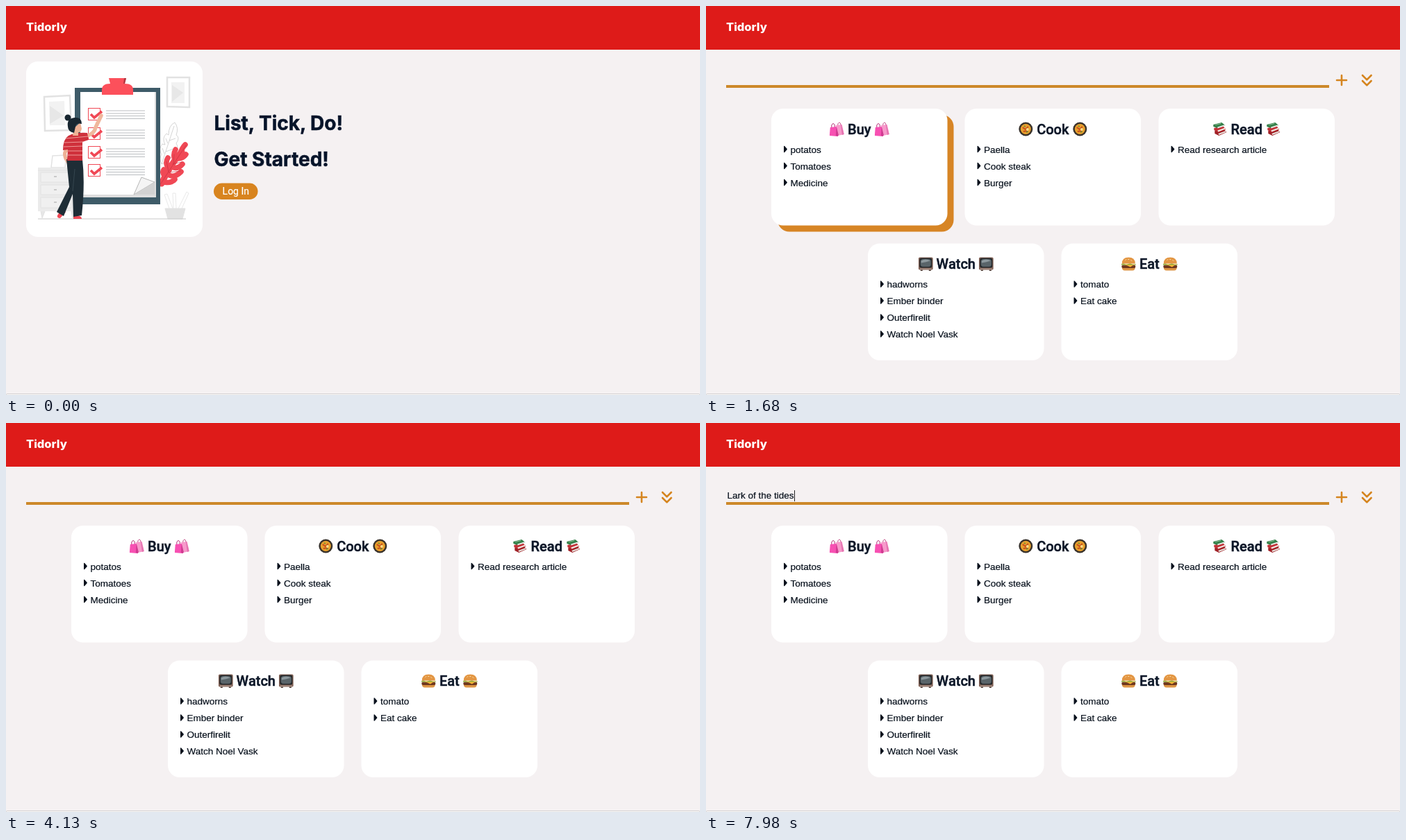
Write an HTML page that moves like this. It is 999 px wide and 561 px high and loops after 8 s.

```html
<!DOCTYPE html>
<html lang="en">
<head>
<meta charset="utf-8">
<title>To-do lists</title>
<style>
  html, body { margin: 0; width: 100%; height: 100%; overflow: hidden; background: #f5f1f2; }
  svg { display: block; }
  #stage { position: absolute; left: 0; top: 0; }
  .logo, .head { font-family: Inter, "Open Sans", sans-serif; }
  .logo { font-size: 16.5px; font-weight: 800; fill: #fff; }
  .head { font-size: 28px; font-weight: 700; fill: #07142a; stroke: #07142a; stroke-width: .5; }
  .btn { font: 14px Roboto, sans-serif; fill: #fff; stroke: #fff; stroke-width: .2; text-anchor: middle; }
  .title { font: 500 20px Roboto, sans-serif; fill: #0c1728; stroke: #0c1728; stroke-width: .5; text-anchor: middle; }
  .item, #input { font: 13.5px "Liberation Sans", Arial, sans-serif; fill: #07101c; }
  .item { stroke: #07101c; stroke-width: .2; }
  #input {
    position: absolute; left: 30.5px; top: 97px; height: 16px; line-height: 16px;
    white-space: pre; color: #07101c; border-right: 1px solid transparent;
    -webkit-text-stroke: .2px #07101c;
  }
  #input.caret { border-color: #222; }
  .icon { fill: none; stroke: #d5851f; stroke-width: 2.6; stroke-linecap: round; stroke-linejoin: round; }
</style>
</head>
<body>
<svg id="stage" width="999" height="561" viewBox="0 0 999 561">
  <defs>
    <symbol id="bag" viewBox="0 0 21 21">
      <path d="M12 7V3q2.500-4 4 0v4" fill="none" stroke="#c4568c"/>
      <path d="M9 5l9-1 3 14-9 2z" fill="#f79acb"/>
      <path d="M17 4l4 14-3 1-2-15z" fill="#e574b1"/>
      <path d="M3 9V5q2.500-5 4.500 0v4" fill="none" stroke="#b32d76"/>
      <path d="M1 8l9-1 2 14-12-1z" fill="#f750b2"/>
      <path d="M10 7l3 12-1 2-3-1z" fill="#cf3a90"/>
    </symbol>
    <symbol id="pan" viewBox="0 0 21 21">
      <circle cx="10.500" cy="10.500" r="10" fill="#3a332c"/>
      <circle cx="10.500" cy="10.500" r="7.500" fill="#e8a02c"/>
      <path d="M6 8l4 3 4-4M7 14l6-1" stroke="#c8501f" stroke-width="2" fill="none"/>
      <circle cx="13" cy="11" r="2" fill="#f7dc86"/>
      <path d="M8 6l2 1M11 15l3-1" stroke="#6f8a35" stroke-width="1.500"/>
    </symbol>
    <symbol id="books" viewBox="0 0 21 21">
      <path d="M3 13l13-3 4 5-11 5-6-3z" fill="#a02026"/>
      <path d="M8 17l11-4v2L9 19z" fill="#e8e4de"/>
      <path d="M2 9l13-3 4 5-11 4-6-3z" fill="#c23036"/>
      <path d="M7 12.500l11-4v2L8 14.500z" fill="#f0ebe4"/>
      <path d="M1 4l12-3 5 4-11 4-6-2z" fill="#35804a"/>
      <path d="M7 7.500L18 4v2L7 9.500z" fill="#e6eae4"/>
      <path d="M4 4.500l8-2" stroke="#8fc09a"/>
    </symbol>
    <symbol id="tv" viewBox="0 0 21 21">
      <rect y="1" width="21" height="18" rx="2" fill="#806054"/>
      <rect x="1.500" y="2" width="18" height="14" rx="2.500" fill="#24282b"/>
      <rect x="3" y="3.500" width="15" height="11" rx="3.500" fill="#596469"/>
      <path d="M4 6q6-4 13 0-6 2-13 3z" fill="#8c989d"/>
      <path d="M2 17.500h17" stroke="#b5a197"/>
      <path d="M3 19h3v1.500H3zm12 0h3v1.500h-3z" fill="#4a3830"/>
    </symbol>
    <symbol id="burger" viewBox="0 0 21 21">
      <path d="M1 15h19q0 5-4 5H5q-4 0-4-5z" fill="#dd9545"/>
      <rect x=".5" y="12" width="20" height="4.500" rx="2" fill="#70381f"/>
      <path d="M1 11h19l-4 2-3 2-4-2z" fill="#fbb934"/>
      <path d="M0 10.500q3-1.500 5 0t5 0 5 0 6 0v1.500H0z" fill="#93ac3c"/>
      <path d="M1 10Q1 1 10.500 1T20 10z" fill="#e39643"/>
      <path d="M6 5l1-1M10 4h1M14 5l1 1" stroke="#fbe3b0" stroke-linecap="round"/>
    </symbol>
  </defs>

  <rect width="999" height="561" fill="#f5f1f2"/>
  <rect width="999" height="63" fill="#de1b19"/>
  <text class="logo" x="29" y="35.500">Tidorly</text>
  <path d="M0 562v-1q0-1.500 2-1.500h995q2 0 2 1.500v1z" fill="#fff" stroke="#cfcccd"/>

  <g id="home">
    <rect x="29" y="80" width="254" height="253" rx="17" fill="#fff"/>
    <!-- wall frames, cabinet, pot -->
    <g stroke="#e2e2e2" fill="#fff">
      <path d="M55 131l37-2 2 50-38 1zM232 103h32v43l-32-1z" stroke-width="2.500"/>
      <path d="M62 138l22-1 1 35H63zM238 110h19v30h-19z" fill="#f2f2f2" stroke="none"/>
      <path d="M63 144l20 14-20 12zM239 114l16 11-16 13z" fill="#e7e7e7" stroke="none"/>
      <path d="M67 216l20-1-2 18H65z" stroke-width="1.500"/>
      <path d="M46 233h56v63H46z" fill="#ebebeb" stroke="none"/>
      <path d="M46 237h56M50 240h44v14H50zM50 258h44v14H50zM50 276h44v15H50z" fill="#f0f0f0"/>
      <path d="M50 296l2 10 4-10M94 296l2 10 4-10" fill="#e6e6e6"/>
      <path d="M69 246h4M69 265h4M69 283h4" stroke="#c9c9c9" stroke-width="2"/>
      <path d="M235 292l-7-20 4-1 8 21M241 292l-1-22h4l1 22M248 292l12-24 3 2-10 22" stroke-width=".8"/>
      <path d="M229 292h29l-4 15h-21z" fill="#e2e2e2"/>
    </g>
    <path d="M46 307h213" stroke="#c8c8c8"/>
    <!-- plant -->
    <path d="M224 228Q220 220 224 214 219 206 225 199l4 1q-5-10 2-16l3 2q0-14 9-18 6 8 2 18 6 4 0 12 5 8-4 12-1 12-17 18zL242 173M228 213l-3-8M230 210l11-4M233 198l-3-7M235 194l9-3" fill="#fff" stroke="#c9c9c9" stroke-width=".8"/>
    <g fill="none" stroke="#f04855" stroke-linecap="round">
      <path d="M224 256q10-24 29-46" stroke-width="9"/>
      <path d="M251 213q2-8 7-13M243 222q-3-8 1-15M235 236q-7-9-2-17M229 246q-5-6-2-10M248 220q7 0 11-6M241 233q7 2 13-5M235 244q8 4 17-5M228 254q10 2 15-4" stroke-width="7.500"/>
      <path d="M221 259q18-28 38-58M234 239l-3-15M241 228l1-14M234 240l17-2M240 228l13-3" stroke="#c83341" stroke-width=".7"/>
    </g>
    <!-- clipboard -->
    <path d="M99 118h123v168H99z" fill="#3e5b68"/>
    <path d="M107 124h109v152H107z" fill="#dedede"/>
    <path d="M107 124h107v133l-30 15h-77z" fill="#fff"/>
    <path d="M184 272l11-25 19 7z" fill="#f4f4f4" stroke="#999" stroke-width=".7"/>
    <path d="M184 272l30-18v18z" fill="#d2d2d2"/>
    <path d="M138 128v-7q0-9 12-9l-2-8h25l-2 8q12 0 12 9v7z" fill="#fc505b"/>
    <path d="M173 104l-2 8h-2l1-8z" fill="#b23741"/>
    <g id="rows"></g>
    <!-- woman -->
    <path d="M89 207q-7 3-3 13l6 9" fill="none" stroke="#eeb195" stroke-width="5"/>
    <path d="M116 188q12-5 13-13l8-17" fill="none" stroke="#f0b79c" stroke-width="5.500" stroke-linecap="round"/>
    <path d="M80 293l-6 9q-1 4 4 4l8-9zM97 300v7h12q0-4-6-5z" fill="#f04855"/>
    <path d="M87 221h23q4 35-1 81l-12 2-1-33-13 32-10-6 18-36z" fill="#1e2d36"/>
    <path d="M96 267l3-32" stroke="#35464f"/>
    <path d="M82 208q0-16 8-21 10-5 27-4l2 10-9 3v27H88l1-16z" fill="#cf303b"/>
    <path d="M86 191l32-3M84 197l27-1M83 203l27-1M89 209h21M89 215h21" stroke="#f2a6a3" stroke-width=".9"/>
    <path d="M98 176l9-8 2 9q-1 6-5 5v5h-8z" fill="#eeb195"/>
    <path d="M89 174q-2-12 10-13 10-1 10 9-8-2-9 4l-2 9q-9-2-9-9z" fill="#182630"/>
    <circle cx="89" cy="161" r="4.500" fill="#182630"/>
    <text class="head" x="299.500" y="178.500">List, Tick, Do!</text>
    <text class="head" x="299.500" y="230.500">Get Started!</text>
    <rect x="299" y="255.500" width="63.500" height="23.500" rx="11.750" fill="#d8841f"/>
    <text class="btn" x="330.800" y="272">Log In</text>
  </g>

  <rect id="line" x="29" y="114" height="4" fill="#cd892a"/>
  <g id="board">
    <path class="icon" d="M908 107h14M915 100v14M945 100l6.300 6.300 6.300-6.300M945 108l6.300 6.300 6.300-6.300"/>
    <rect id="shade" x="103" y="157" width="253.500" height="168.500" rx="17" fill="#d78525"/>
    <g id="cards"></g>
  </g>
</svg>
<div id="input"></div>

<script>
const $ = id => document.getElementById(id);
const show = (id, on) => { $(id).style.display = on ? '' : 'none'; };

// Checklist on the clipboard
$('rows').innerHTML = [147, 175, 202, 228].map(y => `
  <rect x="118.500" y="${y + .5}" width="17" height="17" fill="none" stroke="#f04855"/>
  <path d="M122 ${y + 9}l5 5 11-9" fill="none" stroke="#f04855" stroke-width="3.600"/>
  <path d="M144 ${y + 4}h56m-56 4h56m-56 3.500h56m-56 4h56" stroke="#a9adb0" stroke-width=".8"/>`).join('');

// left, top, title, emoji, emoji distance from the centre, items
const cards = [
  [94, 148, 'Buy', 'bag', 22, ['potatos', 'Tomatoes', 'Medicine']],
  [372.5, 148, 'Cook', 'pan', 28.5, ['Paella', 'Cook steak', 'Burger']],
  [651.5, 148, 'Read', 'books', 28, ['Read research article']],
  [233, 342.5, 'Watch', 'tv', 33, ['hadworns', 'Ember binder', 'Outerfirelit', 'Watch Noel Vask']],
  [511.5, 342.5, 'Eat', 'burger', 19.5, ['tomato', 'Eat cake']]
];

$('cards').innerHTML = cards.map(([x, y, title, emoji, gap, items]) => {
  const mid = 126.8;
  const pic = left => `<use href="#${emoji}" x="${left}" y="19" width="21" height="21"/>`;
  const rows = items.map((item, i) => `
    <path transform="translate(18 ${58.5 + i * 24})" d="M0-4q0-1.300 1.200-.4l3.300 3.600q.8.800 0 1.600l-3.300 3.600q-1.200.9-1.200-.4z" fill="#07101c"/>
    <text class="item" x="27.500" y="${63.5 + i * 24}">${item}</text>`).join('');
  return `<g transform="translate(${x} ${y})">
    <rect width="253.500" height="168.500" rx="17" fill="#fff"/>
    ${pic(mid - gap - 21)}${pic(mid + gap)}
    <text class="title" x="${mid}" y="36.800">${title}</text>${rows}</g>`;
}).join('');

const phrase = 'Lark of the tides';
// time, letters typed
const typing = [
  [4270, 1], [4480, 2], [4830, 4], [5040, 5], [5180, 6], [5320, 8], [5460, 9],
  [5600, 10], [5670, 11], [5880, 12], [6090, 13], [6230, 14], [6300, 16], [6580, 17]
];
const blinks = [2590, 3150, 3640, 4130, 4270, 7070, 7630]; // caret on, off, on, ...

function draw() {
  const t = performance.now() % 8000;
  const past = time => t >= time;
  show('home', !past(1610));
  show('line', past(1610));
  show('board', past(1680));
  show('shade', !past(2170));
  $('line').setAttribute('width', past(1680) ? 868 : 876);
  const typed = typing.filter(([time]) => past(time)).pop();
  $('input').textContent = typed ? phrase.slice(0, typed[1]) : '';
  $('input').classList.toggle('caret', blinks.filter(past).length % 2 === 1);
  requestAnimationFrame(draw);
}
draw();
</script>
</body>
</html>
```
